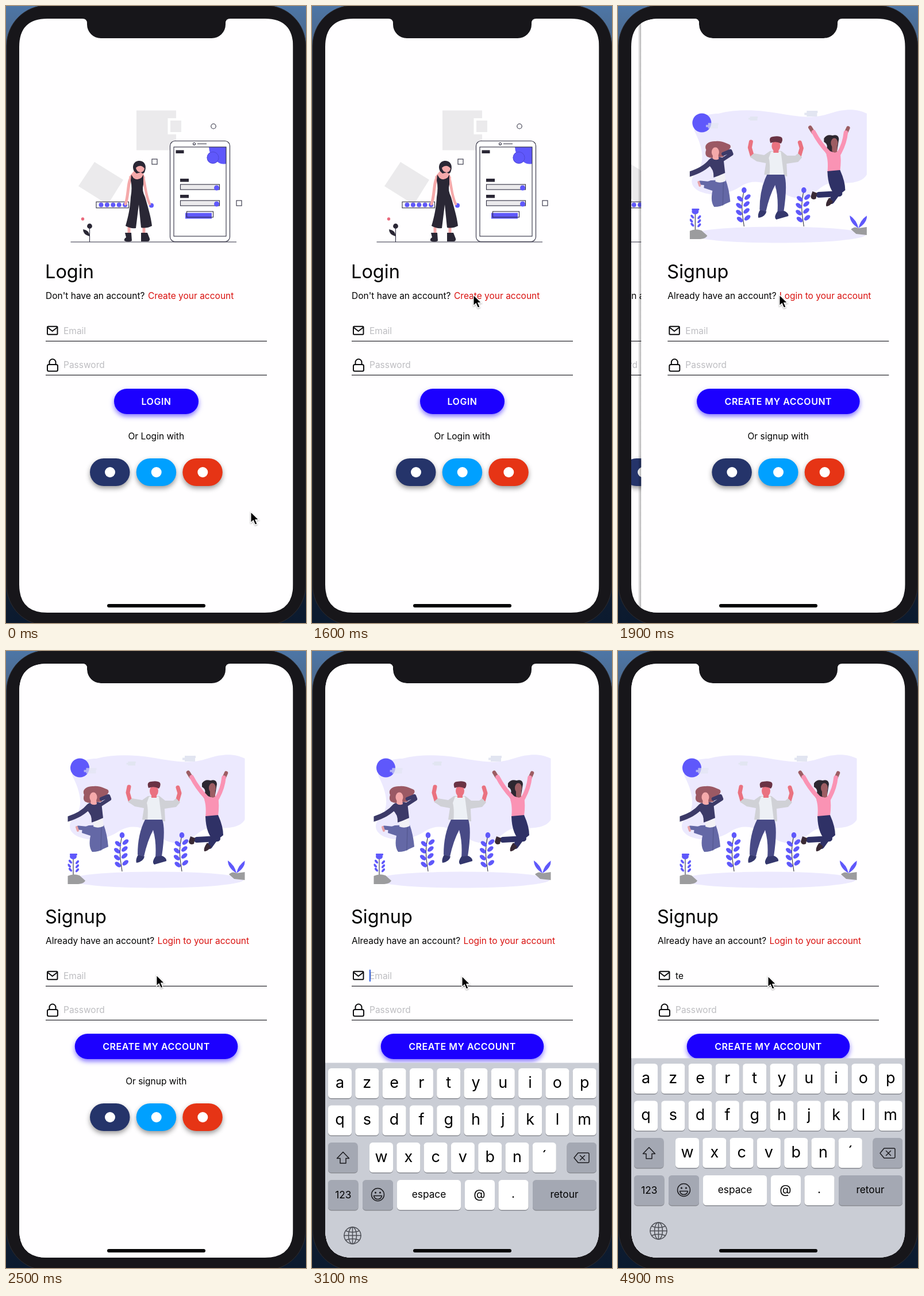
An HTML page that plays this animation: 522x1072 px, repeating every 5 s.

```html
<!DOCTYPE html>
<html lang="en">
<head>
<meta charset="utf-8">
<title>Login and signup</title>
<style>
  html, body { margin: 0; width: 100%; height: 100%; overflow: hidden; background: #17161a; }
  svg { display: block; width: 100%; height: 100%; font-family: Inter, Roboto, sans-serif; font-size: 15.5px; }
  .title { font-size: 32.5px; }
  .link { fill: #d9100e; }
  .hint { fill: #bdbdc1; }
  .label { font-size: 16px; font-weight: 600; letter-spacing: .5px; fill: #fff; text-anchor: middle; }
  .mid { text-anchor: middle; }
  .glow { filter: drop-shadow(0 4px 4px rgba(28, 0, 255, .55)); }
  .drop { filter: drop-shadow(0 4px 4px rgba(0, 0, 0, .4)); }
  .line { fill: none; stroke: #2f2e41; stroke-width: 1.1; }
  .icon { fill: none; stroke: #0c0c0e; stroke-width: 2; stroke-linejoin: round; stroke-linecap: round; }
  .thin { fill: none; stroke: #1c1c20; stroke-width: 1.5; stroke-linejoin: round; stroke-linecap: round; }
  .limb { fill: none; stroke-linecap: round; stroke-linejoin: round; }
  .key { font-size: 27px; }
  .word { font-size: 17.3px; }
</style>
</head>
<body>
<svg id="stage" viewBox="0 0 522 1072" preserveAspectRatio="none"></svg>
<script>
const LOOP = 5000, STEP = 100, WIDTH = 476.5;
const PURPLE = '#5f58fb', INK = '#2a2735', PALE = '#ebeaec', SKIN = '#f5a9aa';

const rect = (x, y, w, h, fill, extra = '') =>
  `<rect x="${x}" y="${y}" width="${w}" height="${h}" fill="${fill}" ${extra}/>`;
const box = (x, y, w, h, rx = 0) =>
  `<rect class="line" x="${x}" y="${y}" width="${w}" height="${h}" rx="${rx}"/>`;
const dot = (x, y, r, fill) => `<circle cx="${x}" cy="${y}" r="${r}" fill="${fill}"/>`;
const oval = (x, y, rx, ry, fill, turn = 0) =>
  `<ellipse cx="${x}" cy="${y}" rx="${rx}" ry="${ry}" fill="${fill}" transform="rotate(${turn} ${x} ${y})"/>`;
const shape = (d, fill) => `<path d="${d}" fill="${fill}"/>`;
const stroke = (d, cls) => `<path class="${cls}" d="${d}"/>`;
const limb = (d, color, width) =>
  `<path class="limb" d="${d}" stroke="${color}" stroke-width="${width}"/>`;
const text = (x, y, words, cls = '') => `<text x="${x}" y="${y}" class="${cls}">${words}</text>`;

function woman() {
  return limb('M219 296C211 306 214 326 208 344', SKIN, 5) +
    limb('M238 296C243 310 242 328 250 344', SKIN, 4.5) +
    shape('M224 285L236 285L242 298L238 310H220L214 297Z', SKIN) +
    limb('M214 385V398M240 385V398', SKIN, 5) +
    shape('M218 293L222 299Q229 304 236 298L239 293L239 310Q236 320 242 332C247 350 252 365 254 382Q245 387 235 385L231 345L226 386Q216 387 208 382C213 365 216 350 217 332Q220 316 217 303Z', INK) +
    shape('M223 287C218 278 223 268 233 269C243 270 245 280 241 289Q238 293 235 289L227 291Z', INK) +
    shape('M226 281Q234 274 241 282Q240 289 234 289Q227 288 226 281Z', SKIN) +
    shape('M207 394H218L219 408Q213 411 206 408Q205 404 209 402ZM235 394H246L250 404Q251 409 246 409H235Z', INK);
}

function loginArt() {
  const dots = [0, 1, 2, 3, 4].map(i => dot(165.5 + 10.4 * i, 345.5, 4, PURPLE)).join('');
  const field = y => rect(303, y - 10, 15, 5.5, INK) + rect(304, y, 68, 9, PALE) +
    box(303.5, y, 68, 9) + dot(366.5, y + 6, 4.5, PURPLE);
  return rect(227, 181.5, 69, 69, PALE) + rect(281.5, 195, 27, 28, '#fff') +
    rect(286, 199, 19, 20, PALE) +
    shape('M154 271L204 302L177 345L126 313Z', PALE) +
    '<circle class="line" cx="361" cy="209" r="4.2"/>' +
    box(254, 266, 9, 9) + box(401, 338, 9, 9) +
    box(157, 340.3, 56.5, 10.5) + dots + dot(253, 346.5, 4, PURPLE) +
    dot(133.5, 370, 2.7, '#ea687c') + dot(145.5, 382.5, 4.4, INK) +
    stroke('M145.5 385V410M112.5 410H401', 'line') +
    shape('M145 400Q134 397 134 388Q146 390 145 400Z', INK) +
    '<rect class="line" x="285.5" y="234.5" width="104" height="175" rx="8.5" style="fill:#fff"/>' +
    stroke('M333 239.5H349', 'line') + '<circle class="line" cx="327.5" cy="239.5" r="2"/>' +
    shape('M353 245H383V274Q374 276 367 270Q354 262 353 245Z', PURPLE) +
    dot(360, 263.5, 10.5, PURPLE) +
    '<circle cx="360" cy="263.5" r="10" fill="none" stroke="#4741c4" stroke-width=".7"/>' +
    box(292, 245, 91, 155) + rect(295.5, 250.5, 14, 5.5, INK) +
    field(310) + field(338) +
    rect(312, 359.5, 46, 10, PURPLE) + box(314.5, 357, 46, 10) + woman();
}

const cloud = (x, y, s) => `<g transform="translate(${x} ${y}) scale(${s})">` +
  rect(-8, -5, 19, 4, '#e2e5f1') + rect(-12, -1.5, 22, 4, '#e2e5f1') + rect(-8, 2, 18, 3, '#e2e5f1') + '</g>';

function sprig(x) {
  let leaves = oval(x, 320, 4.3, 5, PURPLE);
  for (let i = 0; i < 4; i++) {
    const y = 332 + 12 * i, sway = x - 1 - 2 * Math.sin(i);
    leaves += oval(sway - 6, y + 3, 3.6, 6.2, PURPLE, -52) + oval(sway + 7, y, 3.6, 6.2, PURPLE, 52);
  }
  return `<path class="line" d="M${x} 383C${x - 2} 365 ${x - 7} 352 ${x} 320"/>` + leaves;
}

function jumpLeft() {
  const navy = '#3c3a68', jeans = '#6468a6', hair = '#9b5964';
  return shape('M136 250C131 240 142 234 153 235C164 234 172 239 177 241C183 247 170 252 166 262L146 264C140 263 132 262 136 250Z', hair) +
    limb('M126 307L146 309', jeans, 7) + limb('M123 306L125 312', '#e8a3a8', 4) +
    shape('M144 303L170 302Q176 318 178 340L169 344Q162 349 150 349Q143 340 147 321L132 316L133 307Z', jeans) +
    limb('M166 306L165 346', '#53578f', 1.2) +
    shape('M153 293L168 289L170 304Q161 309 152 305Z', '#f2f1f5') +
    limb('M144 270Q132 285 104 293', navy, 9) +
    shape('M143 265Q155 260 166 264L169 290Q158 295 149 298Q150 284 140 276Z', navy) +
    limb('M163 268L180 257L178 252L166 257', navy, 6.5) +
    oval(152, 254, 6.5, 8.5, SKIN) + shape('M148 258H157L158 266Q152 269 147 265Z', SKIN);
}

function jumpMiddle() {
  const coat = '#d0d1d6', pants = '#484a86', flesh = '#ea7280';
  return limb('M216 260L212 246L214 236', flesh, 7) + limb('M298 261L302 247L299 237', flesh, 7) +
    shape('M247 252L267 252L277 260L291 260L296 256L303 263L296 271L276 274L277 296L237 293L240 273L224 270L212 262L219 256L237 259Z', coat) +
    shape('M249 253H266L271 293L246 296Q248 275 245 264Z', '#edf0f5') +
    shape('M242 293H272Q278 310 271 357L260 359Q262 332 256 311Q246 330 240 357L229 354Q229 318 242 293Z', pants) +
    shape('M230 354L241 357Q239 366 227 368Q225 362 230 354ZM260 357L272 356Q280 360 279 365L258 371Q253 367 260 357Z', '#34376d') +
    oval(257.5, 243, 7.5, 10, flesh) + rect(253, 249, 9, 6, flesh) +
    shape('M248 238Q244 228 252 227Q264 225 268 229Q270 234 266 239Q258 234 248 238Z', '#6a3344');
}

function jumpRight() {
  const pink = '#fa93b4', pants = '#2f3166', flesh = '#9d5d63';
  return limb('M317 211L322 219M383 212L379 221', flesh, 6.5) +
    shape('M341 230Q346 222 356 225Q366 222 367 231L364 250L349 258Q340 256 346 247Q348 240 341 236Z', '#2d2730') +
    limb('M323 219Q334 240 351 257', pink, 7.5) + limb('M379 220Q377 240 366 258', pink, 7.5) +
    shape('M348 250Q357 257 368 251Q372 262 369 287L347 289Q349 270 345 258Z', pink) +
    limb('M332 328L368 326', pants, 10) + limb('M354 339L370 317', pants, 10) +
    shape('M347 287L369 285Q378 305 378 320L364 331Q348 320 347 287Z', pants) +
    shape('M321 322L329 325L327 335Q319 338 318 331ZM350 333L357 340Q350 349 345 348Q343 343 350 333Z', '#3a2a35') +
    oval(359, 238, 6, 8.5, flesh) + shape('M355 243H364L364 253Q359 257 355 252Z', flesh);
}

function signupArt() {
  const sideLeaf = [-1, 1].map(s =>
    shape(`M401 386Q${401 + s * 3} 372 ${401 + s * 15} 364Q${401 + s * 15} 377 401 386Z`, PURPLE)).join('');
  let buds = oval(117, 357, 6, 5, PURPLE);
  for (let i = 0; i < 3; i++)
    buds += oval(112 - i % 2 * 2, 366 + 7 * i, 2, 4, PURPLE, -40) + oval(124, 367 + 7 * i, 2, 4, PURPLE, 40);
  return '<g clip-path="url(#artClip)">' +
    shape('M116 218C109 198 133 187 157 187C190 179 225 180 265 187C300 193 325 196 350 187C380 177 400 179 416 187V292C410 305 390 309 370 307C335 302 330 329 306 333C284 337 270 324 252 315C232 303 215 303 200 311C177 327 151 331 130 324C111 318 106 304 116 292C132 278 135 255 116 218Z', '#ece9fe') +
    oval(261.5, 397.5, 152, 14, '#ece9fe') + dot(128.5, 203, 16.5, PURPLE) +
    `<g opacity=".65">${cloud(147, 208, .95)}</g>` + cloud(218, 195.5, .7) + cloud(319, 187, 1) +
    sprig(202) + sprig(306) +
    stroke('M117 389V358', 'line') + buds + rect(111, 352, 13, 3, PURPLE, 'rx="1"') +
    shape('M107 391Q118 386 128 390L138 399Q136 404 126 405H107Z', '#9c9c9e') +
    sideLeaf + shape('M388 388Q394 382 401 386L416 384V398L397 396Z', '#9c9c9e') +
    jumpLeft() + jumpMiddle() + jumpRight() + '</g>';
}

function page(p) {
  const pill = (x, color) => `<g class="drop">${rect(x, 786, 69.5, 48, color, 'rx="24"')}</g>` + dot(x + 35, 810, 9, '#fff');
  return rect(23, 0, WIDTH, 1072, '#fffeff') + p.art() +
    text(68, 473, p.title, 'title') + text(69, 508.5, p.question) + text(p.linkX, 508.5, p.link, 'link') +
    rect(72, 556.8, 17.5, 14, 'none', 'class="icon" rx="1.5"') + stroke('M72.5 558.5L80.7 565L89 558.5', 'icon') +
    rect(72, 623, 18, 11.5, 'none', 'class="icon" rx="2.5"') + stroke('M75.5 622V619a5.5 5.5 0 0 1 11 0V622', 'icon') +
    text(100, 570, 'Email', 'hint email') + text(100, 628.5, 'Password', 'hint') +
    rect(69, 581.7, 385, 1.3, '#333238') + rect(69, 640.7, 385, 1.3, '#333238') +
    `<g class="glow">${rect(261.5 - p.buttonW / 2, 665, p.buttonW, 44, '#1c00ff', 'rx="22"')}</g>` +
    text(261.5, 693, p.button, 'label') + text(261.3, 753, p.footer, 'mid') +
    pill(146, '#25346a') + pill(226.7, '#00a0ff') + pill(307.3, '#e63415');
}

function keyboard() {
  const key = (x, y, w, fill = '#fff') =>
    rect(x, y + 1.4, w, 52, '#898b92', 'rx="5.5"') + rect(x, y, w, 52, fill, 'rx="5.5"');
  const row = (letters, x, y) => [...letters].map((c, i) =>
    key(x + 47.3 * i, y, 41) + text(x + 47.3 * i + 20.5, y + 33.5, c, 'key mid')).join('');
  const gray = '#a4a8b3';
  return rect(23, 707.5, WIDTH, 380, '#cacdd5') +
    row('azertyuiop', 28, 717) + row('qsdfghjklm', 28, 781.5) + row('wxcvbn´', 100, 846) +
    key(28, 846, 51.5, gray) + key(443.5, 846, 51.5, gray) +
    stroke('M54 862.5L43.5 873.5H49V882H59V873.5H64.5Z', 'thin') +
    stroke('M463 864H480a2 2 0 0 1 2 2V879a2 2 0 0 1-2 2H463L456 872.5ZM466.5 868.5L474.5 876.5M474.5 868.5L466.5 876.5', 'thin') +
    key(28, 911, 52.5, gray) + text(54.3, 942.5, '123', 'word mid') +
    key(88, 911, 53, gray) + '<circle class="thin" cx="114.5" cy="936.5" r="11"/>' +
    dot(110.5, 933, 1.6, '#1c1c20') + dot(118.5, 933, 1.6, '#1c1c20') +
    stroke('M107.5 938.5H121.5Q120 944.5 114.5 944.5Q109 944.5 107.5 938.5Z', 'thin') +
    key(148, 911, 111) + text(203.5, 941.5, 'espace', 'word mid') +
    key(266, 911, 52) + text(291.5, 943, '@', 'mid" style="font-size:21px') +
    key(324.5, 911, 52) + text(350, 942, '.', 'mid" style="font-size:21px') +
    key(384, 911, 111, gray) + text(439, 941.5, 'retour', 'word mid') +
    '<g class="thin" style="stroke:#4b4d54"><circle cx="70.5" cy="1007.5" r="14.5"/>' +
    '<ellipse cx="70.5" cy="1007.5" rx="7" ry="14.5"/>' +
    '<path d="M70.5 993V1022M56 1007.5H85M59 999.5Q70.5 1004 82 999.5M59 1015.5Q70.5 1011 82 1015.5"/></g>';
}

const login = {
  art: loginArt, title: 'Login', question: "Don't have an account?", link: 'Create your account',
  linkX: 247, button: 'LOGIN', buttonW: 147, footer: 'Or Login with'
};
const signup = {
  art: signupArt, title: 'Signup', question: 'Already have an account?', link: 'Login to your account',
  linkX: 263.5, button: 'CREATE MY ACCOUNT', buttonW: 283.5, footer: 'Or signup with'
};

document.getElementById('stage').innerHTML = `
  <defs>
    <linearGradient id="sky" x2="0" y2="1">
      <stop stop-color="#4d76a6"/><stop offset=".12" stop-color="#4b5a70"/>
      <stop offset=".28" stop-color="#5a4843"/><stop offset=".5" stop-color="#2b2d36"/>
      <stop offset="1" stop-color="#0b1a2f"/>
    </linearGradient>
    <linearGradient id="edge"><stop stop-opacity="0"/><stop offset="1" stop-opacity=".32"/></linearGradient>
    <clipPath id="artClip"><rect x="107.5" y="170" width="308" height="250"/></clipPath>
    <clipPath id="screen"><path d="M72 22H133Q141 22 141 30V32A24 24 0 0 0 165 56H358A24 24 0 0 0 382 32V30Q382 22 390 22H450.5Q499.5 22 499.5 71V1005Q499.5 1054 450.5 1054H72Q23 1054 23 1005V71Q23 22 72 22Z"/></clipPath>
  </defs>
  ${rect(0, 0, 522, 1072, 'url(#sky)')}
  ${rect(1, -1, 520.5, 1077, '#17161a', 'rx="70" stroke="#2d2c30"')}
  <g clip-path="url(#screen)">
    <g id="login">${page(login)}</g>
    <g id="signup">${rect(17, 0, 6, 1072, 'url(#edge)', 'id="shade"')}${page(signup)}
      ${text(100, 570, '', '" id="typed')}${rect(99.8, 553.5, 2.2, 21, '#3c66dc', 'id="caret" rx="1"')}</g>
    <g id="keyboard">${keyboard()}</g>
  </g>
  ${rect(176, 1039, 171, 6, '#050506', 'rx="3"')}
  <path id="cursor" d="M.8 .8V20L5.2 16L8.5 23.5L12.2 22L9 14.7H15Z" fill="#000" stroke="#fff" stroke-width="1.4"
    style="filter:drop-shadow(0 1px 1px rgba(0,0,0,.35))"/>`;

const el = id => document.getElementById(id);
const placeholder = document.querySelector('#signup .email');
const move = (node, x, y) => node.setAttribute('transform', `translate(${x} ${y})`);

// Critically damped spring: distance left to travel, from 1 to 0.
function springLeft(ms) {
  const x = 18.3 * Math.max(0, ms) / 1000;
  return (1 + x) * Math.exp(-x);
}

const path = [[0, 425, 878], [250, 425, 878], [1350, 280, 501], [1950, 280, 501], [2450, 261, 562], [2700, 260, 564], [LOOP, 260, 564]];
function cursorAt(t) {
  const i = path.findIndex(p => p[0] > t);
  const [t0, x0, y0] = path[i - 1], [t1, x1, y1] = path[i];
  const u = (t - t0) / (t1 - t0), e = u * u * (3 - 2 * u);
  return [x0 + (x1 - x0) * e, y0 + (y1 - y0) * e];
}

function caretOpacity(t) {
  if (t < 2800) return 0;
  if (t >= 4300) return t < 4800 ? 1 : 0;
  const phase = (t - 2800) % 1000 / 1000;
  return t < 3300 ? 1 : Math.max(0, Math.min(1, phase / .15, (.7 - phase) / .15));
}

function draw(t) {
  const left = springLeft(t - 1620);
  move(el('login'), -.3 * WIDTH * (1 - left), 0);
  move(el('signup'), WIDTH * left, 0);
  el('shade').setAttribute('opacity', t > 1620 ? 1 : 0);
  move(el('keyboard'), 0, 350 * springLeft(t - 2790));
  move(el('cursor'), ...cursorAt(t));

  const typed = t < 4300 ? '' : t < 4500 ? 't' : 'te';
  el('typed').textContent = typed;
  placeholder.setAttribute('opacity', typed ? 0 : 1);
  el('caret').setAttribute('opacity', caretOpacity(t));
  move(el('caret'), [0, 6, 15][typed.length], 0);
}

const start = performance.now();
function tick() {
  const t = (performance.now() - start) % LOOP;
  draw(Math.floor(t / STEP) * STEP);
  requestAnimationFrame(tick);
}
tick();
</script>
</body>
</html>
```
